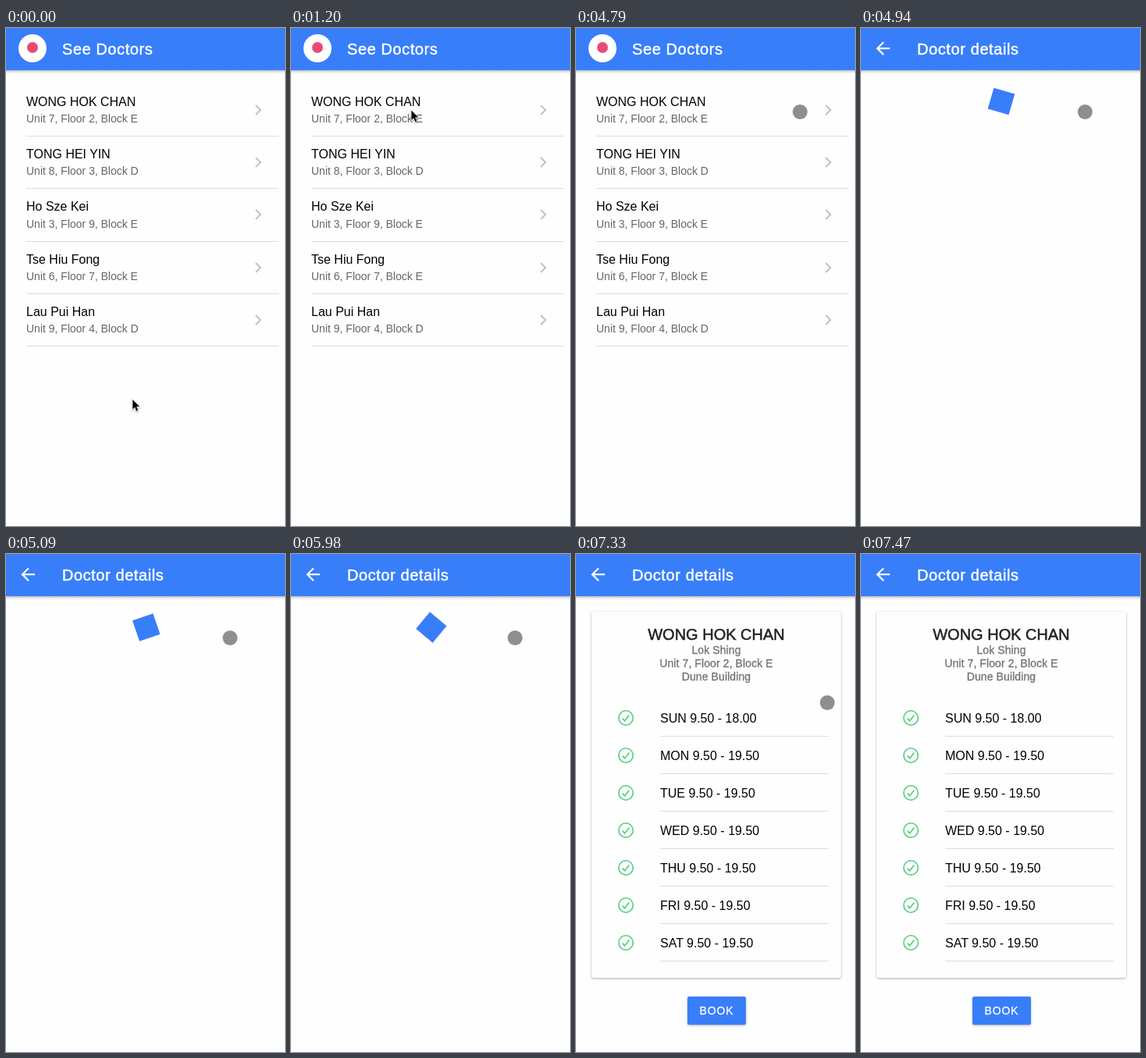
An HTML page that plays this animation: 358 by 638 pixels, repeating every 8 s.

```html
<!DOCTYPE html>
<html lang="en">
<head>
<meta charset="utf-8">
<title>See Doctors</title>
<style>
  html, body { margin: 0; width: 100%; height: 100%; overflow: hidden; background: #fefefe; }
  svg { display: block; width: 358px; height: 638px; font-family: "Liberation Sans", Arial, sans-serif; }
  .title { font-size: 20px; fill: #fff; stroke: #fff; stroke-width: .45px; letter-spacing: .6px; }
  .name { font-size: 16px; }
  .sub { font-size: 14px; fill: #666; }
  .line { fill: #dcdcdc; }
  .chevron { fill: none; stroke: #c1c1c1; stroke-width: 2px; }
  .mid { text-anchor: middle; }
  .head { font-size: 20px; fill: #222; stroke: #222; stroke-width: .5px; }
  .info { font-size: 14px; fill: #737373; stroke: #737373; stroke-width: .3px; letter-spacing: .1px; }
  .check { fill: none; stroke: #4dd07b; stroke-width: 1.6px; }
  .btn { font-size: 14px; fill: #fff; stroke: #fff; stroke-width: .3px; letter-spacing: .84px; }
  .card { filter: drop-shadow(0 1.5px 1.5px rgba(0, 0, 0, .32)); }
  #arrow { filter: drop-shadow(0 1px 1px rgba(0, 0, 0, .35)); }
</style>
</head>
<body>
<svg viewBox="0 0 358 638">
  <defs>
    <linearGradient id="shade" x2="0" y2="1">
      <stop offset="0" stop-opacity=".27"/>
      <stop offset=".4" stop-opacity=".1"/>
      <stop offset="1" stop-opacity="0"/>
    </linearGradient>
  </defs>
  <rect width="358" height="638" fill="#fefefe"/>
  <rect y="54" width="358" height="5" fill="url(#shade)"/>
  <rect width="358" height="54" fill="#387ef9"/>

  <g id="list">
    <circle cx="34" cy="26" r="18" fill="#fff"/>
    <circle cx="34" cy="25" r="7" fill="#ec4a74"/>
    <text class="title" x="72" y="34">See Doctors</text>
    <g id="rows"></g>
  </g>

  <g id="details">
    <path transform="translate(15 13) scale(1.1)" fill="#fff"
      d="M20 11H7.83l5.59-5.59L12 4l-8 8 8 8 1.41-1.41L7.83 13H20z"/>
    <text class="title" x="72" y="34">Doctor details</text>
    <rect id="spinner" x="166" y="80" width="28" height="28" fill="#387ef9"/>
    <g id="card">
      <rect class="card" x="20" y="74" width="320" height="469" rx="3" fill="#fefefe"/>
      <text class="head mid" x="180" y="110">WONG HOK CHAN</text>
      <text class="info mid" x="180" y="128">Lok Shing</text>
      <text class="info mid" x="180" y="145">Unit 7, Floor 2, Block E</text>
      <text class="info mid" x="180" y="162">Dune Building</text>
      <g id="days"></g>
      <rect class="card" x="143" y="567" width="75" height="36" rx="2" fill="#387ef9"/>
      <text class="btn mid" x="180.5" y="590">BOOK</text>
    </g>
  </g>

  <circle id="dot" r="9.5" fill="#8e8e8e"/>
  <path id="arrow" d="M0 .5V13L2.9 10.3L5 15.2L6.9 14.4L4.9 9.6H8.8Z"
    stroke="#fff" stroke-width="1.6" paint-order="stroke"/>
</svg>
<script>
const $ = id => document.getElementById(id);
const LOOP = 8000, STEP = 149.33;
const PITCH = 67.25;

const doctors = [
  ["WONG HOK CHAN", "Unit 7, Floor 2, Block E"],
  ["TONG HEI YIN", "Unit 8, Floor 3, Block D"],
  ["Ho Sze Kei", "Unit 3, Floor 9, Block E"],
  ["Tse Hiu Fong", "Unit 6, Floor 7, Block E"],
  ["Lau Pui Han", "Unit 9, Floor 4, Block D"]
];

$("rows").innerHTML = doctors.map(([name, place], i) => {
  const at = y => Math.round(y + PITCH * i);
  return `<text class="name" x="26" y="${at(99.9)}">${name}</text>
    <text class="sub" x="26" y="${at(121)}">${place}</text>
    <rect class="line" x="26" y="${at(138.2)}" width="324" height="1"/>
    <path class="chevron" d="M320.5 ${at(98.9)}l6 6l-6 6"/>`;
}).join("");

$("days").innerHTML = ["SUN", "MON", "TUE", "WED", "THU", "FRI", "SAT"].map((day, i) => {
  const y = 210 + 48 * i;
  return `<circle class="check" cx="64" cy="${y}" r="9.2"/>
    <path class="check" d="M59.6 ${y + .6}l3 3.2l5.6 -7.2"/>
    <text class="name" x="108" y="${y + 6}">${day} 9.50 - ${i ? "19.50" : "18.00"}</text>
    <rect class="line" x="108" y="${y + 23}" width="216" height="1"/>`;
}).join("");

const clamp = x => Math.min(1, Math.max(0, x));
const ease = x => x * x * (3 - 2 * x);
const show = (id, on) => $(id).setAttribute("display", on ? "inline" : "none");
const move = (id, [x, y]) => $(id).setAttribute("transform", `translate(${x} ${y})`);

function arrowAt(n) {
  if (n < 9) {
    const p = ease(clamp((n - 3) / 5)), q = 1 - p;
    const curve = (a, b, c) => q * q * a + 2 * q * p * b + p * p * c;
    return [curve(162.5, 99, 154.5), curve(475.5, 230, 105)];
  }
  const p = ease(clamp((n - 9) / 6));
  return [154.5 + 133 * p, 105 + 2 * p];
}

function dotAt(n) {
  if (n < 46) return [287.5, 107.5];
  const k = n - 46;
  return [313.5 + 3 * k, 124.5 + 22 * k];
}

function draw(t) {
  // the screen refreshes in coarse, even steps
  const n = Math.floor(t / STEP);
  const opened = n >= 33, loaded = n >= 47;
  show("list", !opened);
  show("details", opened);
  show("spinner", !loaded);
  show("card", loaded);
  show("arrow", n < 32);
  show("dot", n >= 32 && n < 50);
  move("arrow", arrowAt(n));
  move("dot", dotAt(n));
  $("spinner").setAttribute("transform", `rotate(${71 + 54.8 * (n - 34)} 180 94)`);
}

const start = performance.now();
function tick() {
  draw((performance.now() - start) % LOOP);
  requestAnimationFrame(tick);
}
tick();
</script>
</body>
</html>
```
